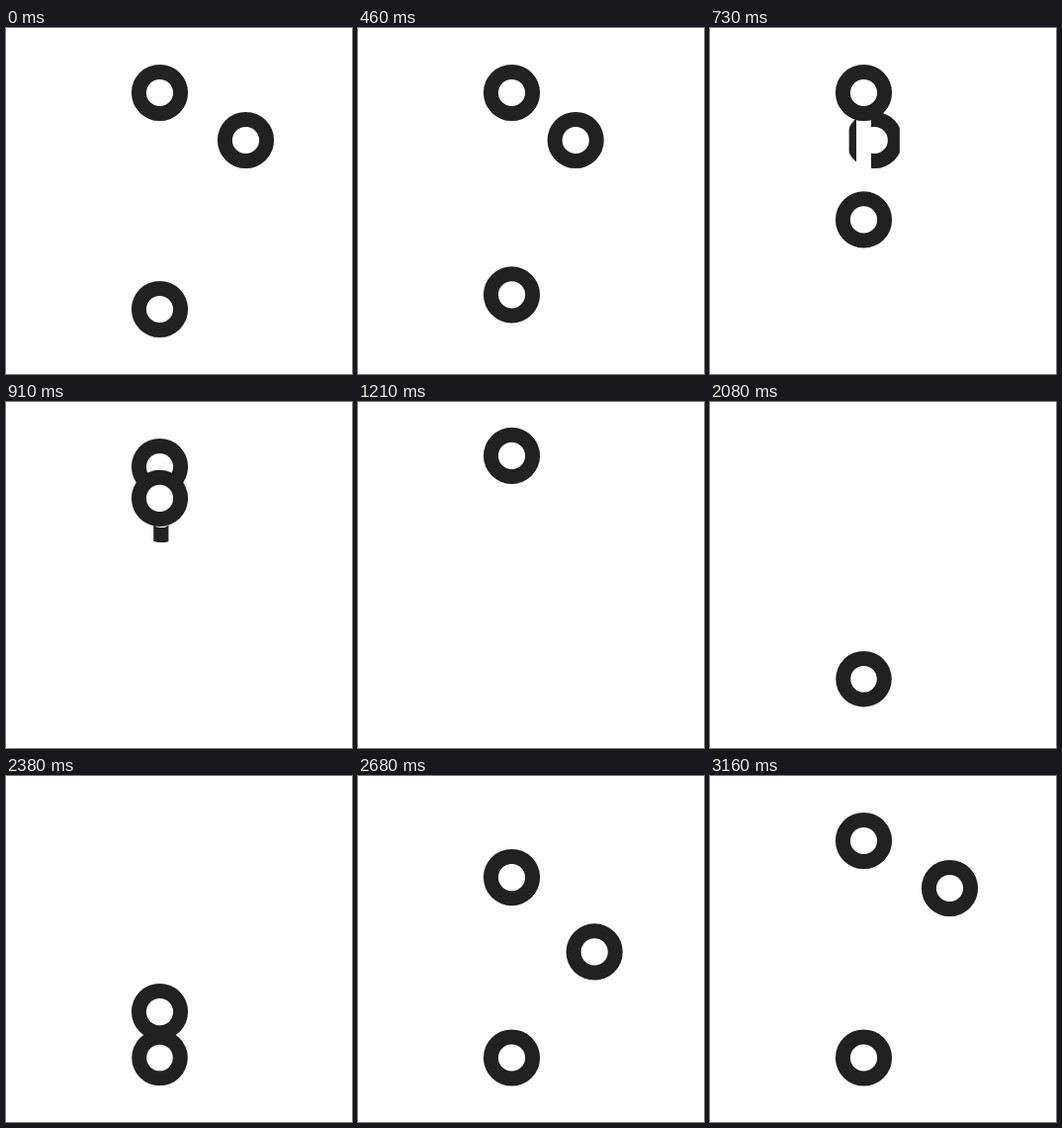
These frames come from a looping animation (350x350 px, 3220 ms). An HTML page with a canvas:

```html
<!DOCTYPE html>
<html lang="en">
<head>
<meta charset="utf-8">
<title>Branching rings</title>
<style>
  html, body { margin: 0; width: 100%; height: 100%; overflow: hidden; background: #fff; }
  canvas { display: block; width: 350px; height: 350px; }
</style>
</head>
<body>
<canvas id="stage" width="350" height="350"></canvas>
<script>
const ctx = document.getElementById('stage').getContext('2d');
const LOOP = 3220, STEP = 30, HOLD = 130;
const INK = '#212121', PAPER = '#fff';
const R = 28.6, BAND = 15;
const X = 155.5, TOP = 65.5, BOTTOM = 285, SIDE_X = 242.5, SIDE_Y = 113.5;

// Cubic easing with control points (a, 0) and (b, 1).
function ease(t, start, length, a = 0.73, b = 0.265) {
  const x = Math.min(1, Math.max(0, (t - start) / length));
  let lo = 0, hi = 1;
  for (let i = 0; i < 24; i++) {
    const s = (lo + hi) / 2, r = 1 - s;
    if (3 * a * s * r * r + 3 * b * s * s * r + s * s * s < x) lo = s;
    else hi = s;
  }
  const s = x === 0 ? 0 : x === 1 ? 1 : lo;
  return s * s * (3 - 2 * s);
}

const mix = (from, to, p) => from + (to - from) * p;

function disc(x, y, r, color) {
  ctx.fillStyle = color;
  ctx.beginPath();
  ctx.arc(x, y, r, 0, Math.PI * 2);
  ctx.fill();
}

function ring(x, y, r = R) {
  if (r < 0.6) return;
  disc(x, y, r, INK);
  disc(x, y, Math.max(0.5, r - BAND), PAPER);
}

function stem(from, to) {
  ctx.fillStyle = PAPER;
  ctx.fillRect(X - BAND / 2, from, BAND, to - from);
}

// The lower ring climbs into the upper one while the side ring slides in.
function gather(t) {
  const y = mix(284.5, 49.5, ease(t, 124, 1300));
  const half = t < 700 ? R + 1 : R - (t - 700) * 0.1;
  if (half > 0) {
    const x = mix(SIDE_X, X, ease(t, 121, 913, 0.6, 0.31));
    ctx.save();
    ctx.beginPath();
    ctx.rect(x - half, 0, half * 2, 350);
    ctx.clip();
    ring(x, SIDE_Y);
    ctx.restore();
  }
  const upper = Math.min(TOP, y);
  stem(upper, y);
  const r = R * (1 - ease(t, 1156, 1066));
  ring(X, upper, r);
  if (y > upper) ring(X, y, r);
}

// A new ring grows below, rises and sends one ring out to the side.
function branch(t) {
  const y = mix(BOTTOM, TOP, ease(t, 1864, 1301));
  if (t > 2380) {
    const out = ease(t, 2380, 340, 1 / 3, 2 / 3);
    const up = ease(t, 2380, 780, 0.33, 0.39);
    ring(mix(X, SIDE_X, out), mix(237.5, SIDE_Y, up));
    stem(y, BOTTOM);
  }
  ring(X, BOTTOM, R * ease(t, 1500, 1000));
  ring(X, y, R * ease(t, 1146, 1066));
}

function draw(t) {
  ctx.fillStyle = PAPER;
  ctx.fillRect(0, 0, 350, 350);
  // The new ring stays unseen until the old one is well into shrinking.
  if (t > 1330) branch(t);
  if (t < 2230) gather(t);
}

const begin = performance.now();
function tick() {
  const t = (performance.now() - begin) % LOOP;
  const shown = t < HOLD ? 0 : HOLD + Math.floor((t - HOLD) / STEP) * STEP;
  draw(Math.min(shown, 3160));
  requestAnimationFrame(tick);
}
tick();
</script>
</body>
</html>
```
